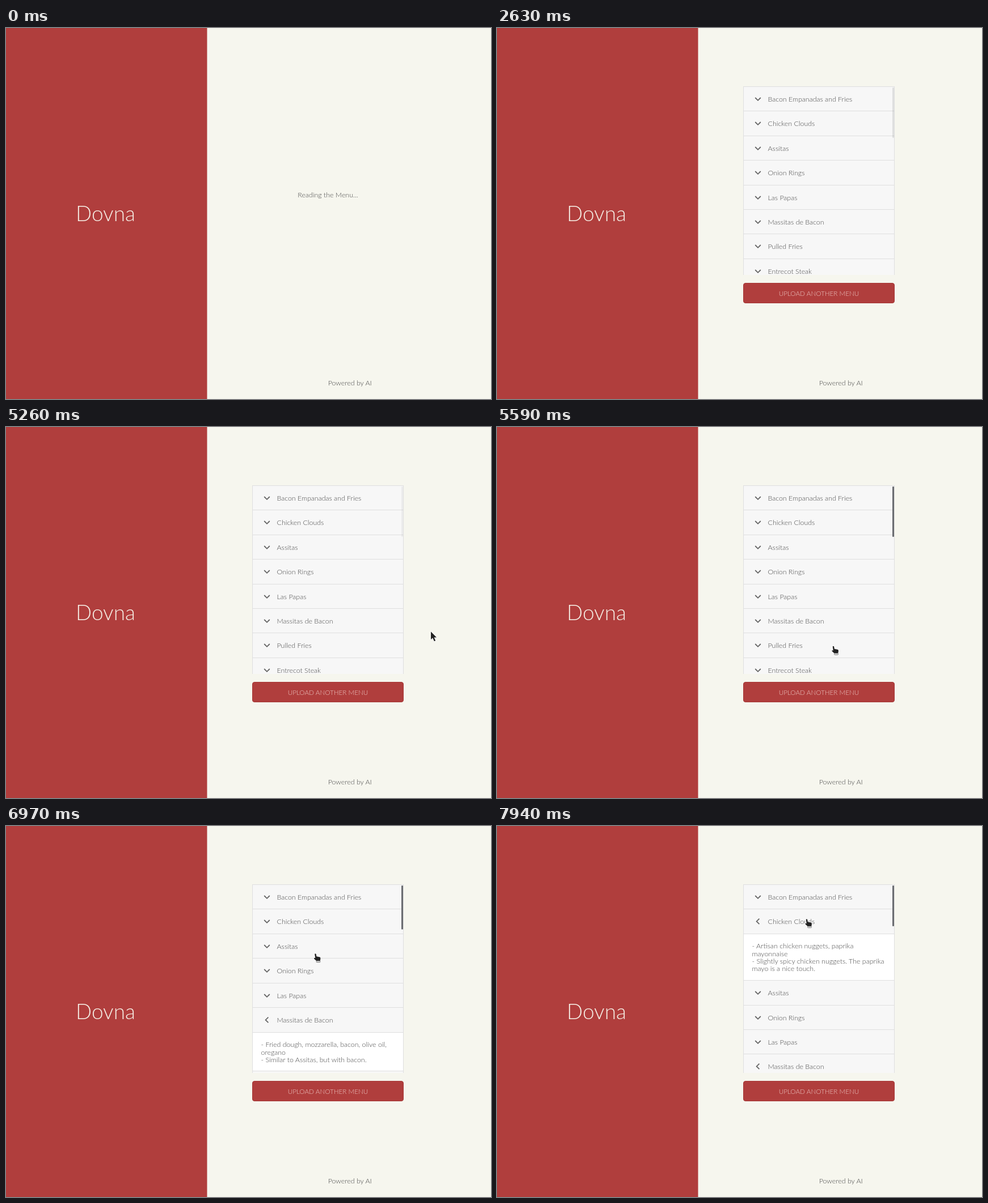
Animation of 855 by 655 pixels, one loop 8.94 s. Source, as an HTML page:

```html
<!DOCTYPE html>
<html lang="en">
<head>
<meta charset="utf-8">
<title>Menu reader</title>
<style>
  html, body { margin: 0; width: 100%; height: 100%; overflow: hidden; background: #f6f6ee; }
  svg { display: block; }
  text { font: 300 12.4px Lato, "Open Sans", sans-serif; fill: #484848; }
  .title { font-size: 37px; fill: #f6efe6; }
  .button { font-size: 11.7px; fill: #eec9c5; }
  .middle { text-anchor: middle; }
  .row { fill: #f7f7f7; stroke: #dfdfdf; }
  .panel { fill: #fff; stroke: #dfdfdf; }
  .chevron { fill: none; stroke: #666; stroke-width: 1.8; }
  .cursor path { fill: #222; stroke: #fff; paint-order: stroke; stroke-width: 1.6; stroke-linejoin: round; }
  .cursor .cuff { fill: #eee; stroke: #777; stroke-width: 1; }
</style>
</head>
<body>
<svg width="855" height="655" viewBox="0 0 855 655">
  <clipPath id="view"><rect x="434" y="103" width="267" height="333"/></clipPath>
  <rect width="354.5" height="655" fill="#b03e3d"/>
  <text class="title middle" x="175.5" y="341">Dovna</text>
  <text class="middle" x="606.3" y="631">Powered by AI</text>
  <text id="loading" class="middle" x="567.5" y="299">Reading the Menu...</text>
  <g id="result">
    <g id="list" clip-path="url(#view)"></g>
    <rect id="thumb" x="697" y="105" width="3" rx="1.2" fill="#6a6c70"/>
    <rect x="434.5" y="450.5" width="266" height="35" rx="3.5" fill="#b03e3d" stroke="#a63837"/>
    <text class="button middle" x="567.5" y="472.5">UPLOAD ANOTHER MENU</text>
  </g>
  <g id="cursor" class="cursor">
    <path id="arrow" d="M.5 .5V14.5l3.2-3 2.6 6 2.4-1.1-2.6-5.8h4.4Z"/>
    <g id="hand">
      <path d="M2.2 2Q3.4 .6 4.6 2L5.4 6.2 11.5 7.6Q12.8 8.4 12.4 10.5L11.8 14H5L1 10.2Q.5 8.4 2.6 9L3.2 9.2Z"/>
      <rect class="cuff" x="5" y="14.2" width="7" height="2.4" rx="1"/>
    </g>
  </g>
</svg>
<script>
const LOOP = 8940, LIST_TOP = 103, ROW = 43.4, LINE = 13.33, PADDING = 29;

// opens: start, end and number of steps of the unfolding
const dishes = [
  { name: "Bacon Empanadas and Fries" },
  { name: "Chicken Clouds", opens: [7780, 7940, 3], lines: [
    "- Artisan chicken nuggets, paprika", "mayonnaise",
    "- Slightly spicy chicken nuggets. The paprika", "mayo is a nice touch."] },
  { name: "Assitas" },
  { name: "Onion Rings" },
  { name: "Las Papas" },
  { name: "Massitas de Bacon", opens: [6720, 6890, 3], lines: [
    "- Fried dough, mozzarella, bacon, olive oil,", "oregano",
    "- Similar to Assitas, but with bacon."] },
  { name: "Pulled Fries", opens: [5830, 5990, 3], lines: [
    "- French fries, pulled pork, barbecue sauce", "and melted cheese",
    "- A generous plate to share."] },
  { name: "Entrecot Steak" }
];

// start, end, steps, x, y
const moves = [
  [3440, 3680, 4, 838, 347],
  [5260, 5590, 5, 589.5, 385.5],
  [6240, 6400, 3, 556.5, 338.5],
  [6890, 6970, 2, 542, 224],
  [7050, 7370, 5, 542.5, 163]
];

const byId = id => document.getElementById(id);
const show = (node, on) => node.setAttribute("display", on ? "inline" : "none");
const easeOut = p => 1 - (1 - p) ** 2;

function add(parent, tag, attributes, content = "") {
  const node = document.createElementNS("http://www.w3.org/2000/svg", tag);
  for (const key in attributes) node.setAttribute(key, attributes[key]);
  node.textContent = content;
  return parent.appendChild(node);
}

// Progress from 0 to 1 in equal hard steps, the first one at start.
function stepped(t, start, end, steps) {
  if (t < start) return 0;
  const index = Math.floor((t - start) / (end - start) * (steps - 1) + 0.1);
  return Math.min(1, (index + 1) / steps);
}

// Each row is a pixel taller than its pitch, so neighbours share one line.
for (const dish of dishes) {
  const group = dish.group = add(byId("list"), "g");
  if (dish.lines) {
    dish.height = dish.lines.length * LINE + PADDING;
    add(group, "rect", { class: "panel", x: 434.5, y: 43.5, width: 266, height: dish.height + 1 });
    dish.lines.forEach((line, i) =>
      add(group, "text", { x: 449.5, y: Math.round(ROW + 27 + i * LINE) }, line));
  }
  add(group, "rect", { class: "row", x: 434.5, y: 0.5, width: 266, height: 44 });
  dish.chevron = add(group, "path", { class: "chevron", d: "M-4.8-2.4 0 2.4 4.8-2.4" });
  add(group, "text", { x: 477.5, y: 27 }, dish.name);
}

function drawList(t) {
  let y = LIST_TOP, thumbHeight = 89;
  for (const { group, chevron, opens, height } of dishes) {
    const open = opens ? stepped(t, ...opens) : 0;
    group.setAttribute("transform", `translate(0 ${Math.round(y)})`);
    chevron.setAttribute("transform", `translate(460 22.4) rotate(${90 * open})`);
    y += ROW + (open && height * open);
    thumbHeight -= 5.7 * open;
  }
  const visible = stepped(t, 1500, 1650, 3) - stepped(t, 2550, 2710, 3) + stepped(t, 5260, 5590, 5);
  byId("thumb").setAttribute("height", thumbHeight);
  byId("thumb").setAttribute("opacity", Math.max(0, visible) ** 1.6);
}

function drawCursor(t) {
  let x = 562, y = -211;
  for (const [start, end, steps, toX, toY] of moves) {
    const p = easeOut(stepped(t, start, end, steps));
    x += (toX - x) * p;
    y += (toY - y) * p;
  }
  const overList = x > 434 && x < 697 && y > LIST_TOP && y < 436;
  byId("cursor").setAttribute("transform", `translate(${x} ${y})`);
  show(byId("hand"), overList);
  show(byId("arrow"), !overList);
}

function draw(now) {
  const t = now % LOOP;
  show(byId("loading"), t < 1500);
  show(byId("result"), t >= 1500);
  drawList(t);
  drawCursor(t);
}

const origin = performance.now();
function frame() {
  draw(performance.now() - origin);
  requestAnimationFrame(frame);
}
frame();
</script>
</body>
</html>
```
